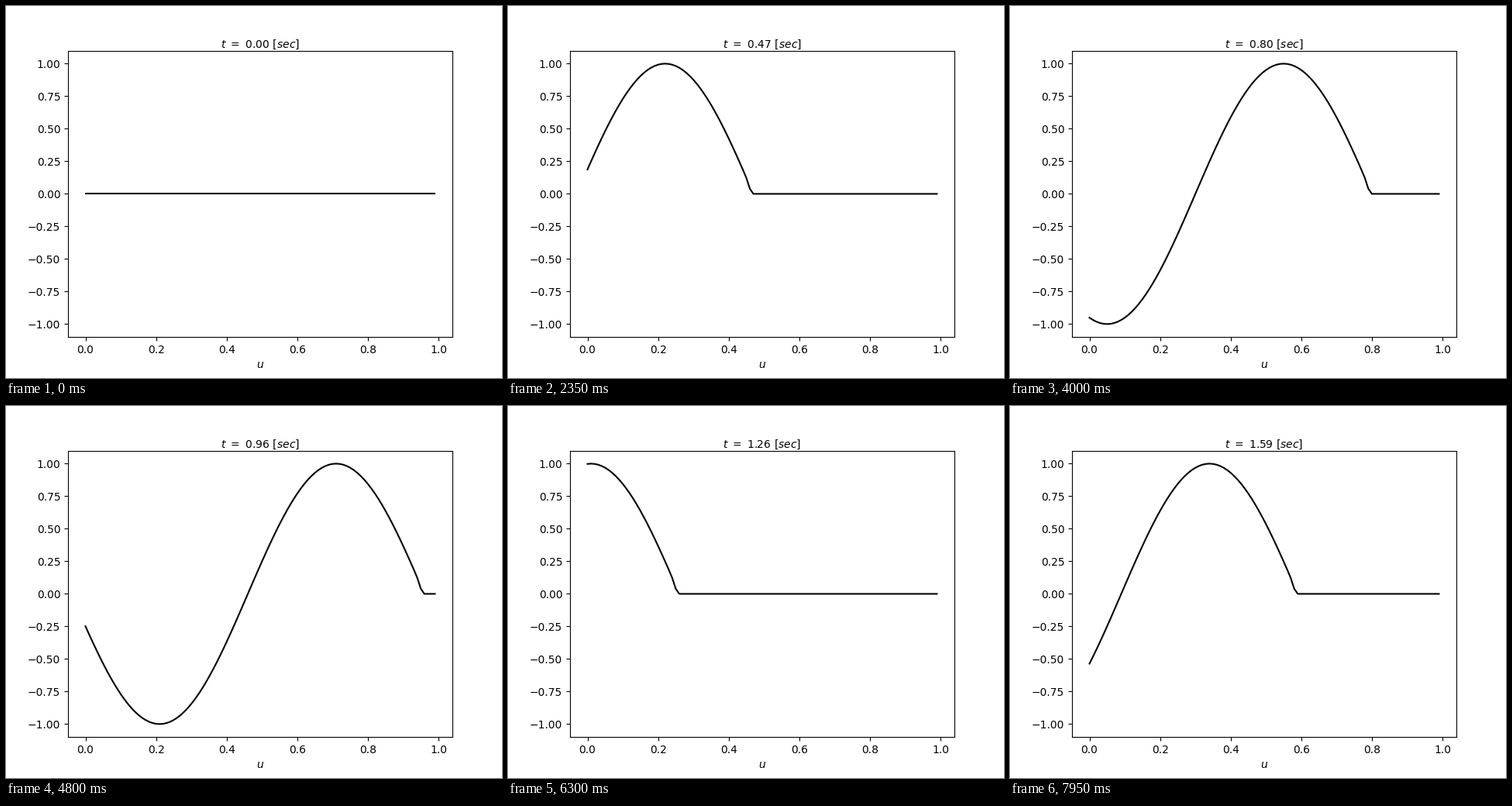
A matplotlib script that plays this animation: 640 px wide and 480 px high, repeating every 8 s.

```python
import numpy as np
import matplotlib.pyplot as plt
from matplotlib.animation import FuncAnimation

FRAMES = 160
STEP_MS = 50
N = 100          # grid points, also steps until the wave restarts
DT = 0.01

grid = np.arange(N)
x = grid * DT


def wave(step):
    """Sine travelling right, with a softened leading edge."""
    age = np.clip(step % N - grid, 0, None)
    return np.sin(2 * np.pi * age * DT) * (1 - np.exp(-age.astype(float) ** 2))


fig, ax = plt.subplots(figsize=(6.4, 4.8), dpi=100)
ax.set_xlim(-0.0495, 1.0395)
ax.set_ylim(-1.1, 1.1)
ax.set_xlabel("$u$")
line, = ax.plot(x, wave(0), color="black", lw=1.5)
clock = ax.text(0.5, 1.01, "", ha="center", va="baseline",
                transform=ax.transAxes)


def draw(step):
    line.set_ydata(wave(step))
    clock.set_text(rf"$t\ =\ {step * DT:.2f}\ [sec]$")
    return line, clock


anim = FuncAnimation(fig, draw, frames=FRAMES, interval=STEP_MS,
                     repeat=True, repeat_delay=0)
plt.show()
```
